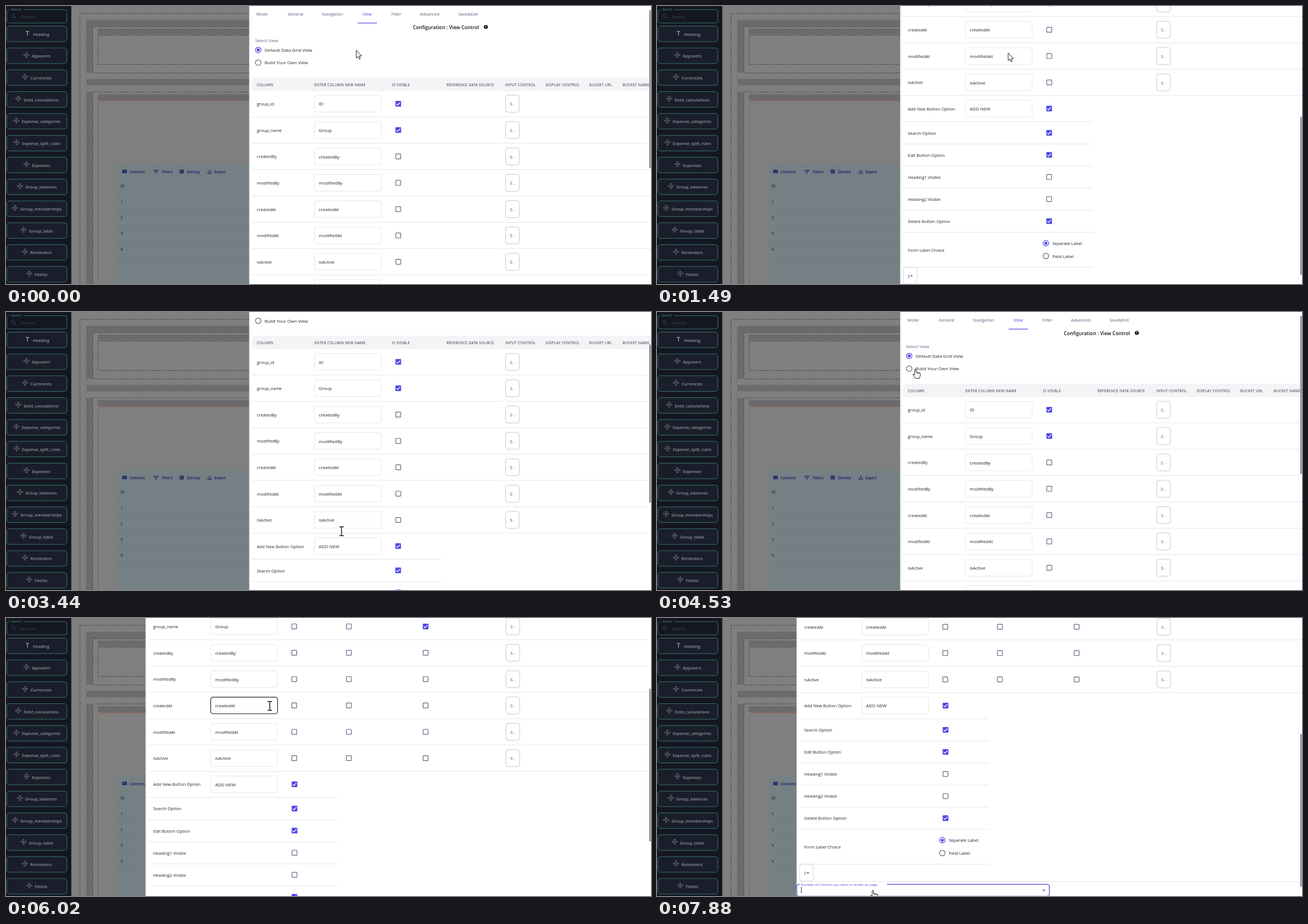
Write an HTML page with a canvas that moves like this. It is 1139 by 492 pixels and loops after 8000 ms.

```html
<!DOCTYPE html>
<html lang="en">
<head>
<meta charset="utf-8">
<title>View configuration</title>
<style>
html, body { margin: 0; width: 100%; height: 100%; overflow: hidden; background: #808080; }
canvas { display: block; width: 1139px; height: 492px; }
</style>
</head>
<body>
<canvas id="stage"></canvas>
<script>
const W = 1139, H = 492, LOOP = 8000, WIDEN = 4670, FOCUS = 7740;
const BLUE = '#4f46e5', INK = '#1f2430', LINE = '#e4e6eb';
const canvas = document.getElementById('stage');
const c = canvas.getContext('2d');
const dpr = window.devicePixelRatio || 1;
canvas.width = W * dpr;
canvas.height = H * dpr;

const ENTITIES = ['Heading', 'Appusers', 'Currencies', 'Debt_calculations', 'Expense_categories',
  'Expense_split_rules', 'Expenses', 'Group_balances', 'Group_memberships', 'Group_table',
  'Reminders', 'Filelist'];
const FIELDS = ['group_id', 'group_name', 'createdBy', 'modifiedBy', 'createdAt', 'modifiedAt', 'isActive'];
const OPTIONS = [['Search Option', 1], ['Edit Button Option', 1], ['Heading1 Visible', 0],
  ['Heading2 Visible', 0], ['Delete Button Option', 1]];
const TABS = [['Mode', 442], ['General', 497.5], ['Navigation', 558], ['View', 629.5],
  ['Filter', 680.5], ['Advanced', 731], ['Save&Exit', 799]];
const SHARED_HEADS = ['REFERENCE DATA SOURCE', 'INPUT CONTROL', 'DISPLAY CONTROL', 'BUCKET URL', 'BUCKET NAME'];
const SHARED_X = [778, 882, 953, 1030, 1089];

// [time, scroll offset]
const SCROLL_NARROW = [[490, 0], [520, 9], [940, 159.3], [1420, 317.5], [2640, 317.5], [2680, 308], [3440, 85], [3720, 0]];
const SCROLL_WIDE = [[5385, 0], [5410, 10], [5480, 39.3], [6300, 290], [6580, 335], [6650, 344]];
// [time, x, y]
const POINTER = [[249, 618, 78], [250, 619, 77], [1430, 619, 77], [2150, 649, 354], [2190, 649, 354],
  [2420, 601, 382], [2640, 601, 382], [2900, 592.5, 388], [3720, 592.5, 388], [4300, 465, 89],
  [4330, 464, 88], [4530, 456, 101], [5040, 456, 101], [5210, 464, 103], [5400, 464, 103],
  [5480, 465, 106], [6250, 466, 169], [6640, 466, 169], [7000, 400, 446], [7340, 374, 463],
  [7570, 374, 463], [7600, 380, 467], [7720, 380, 467], [7880, 381, 482]];

function track(keys, t, k, ease = u => u) {
  if (t <= keys[0][0]) return keys[0][k];
  for (let i = 1; i < keys.length; i++) {
    const a = keys[i - 1], b = keys[i];
    if (t < b[0]) return a[k] + (b[k] - a[k]) * ease((t - a[0]) / (b[0] - a[0]));
  }
  return keys[keys.length - 1][k];
}
const smooth = u => u * u * (3 - 2 * u);

function pointerKind(t) {
  if ((t > 2850 && t < 3760) || (t > 5560 && t < 6720)) return 'text';
  if ((t > 4470 && t < WIDEN) || t > 7040) return 'hand';
  return 'arrow';
}

// y is the middle of the capitals
function text(s, x, y, size = 7.5, color = INK, weight = 400, spacing = 0) {
  c.font = `${weight} ${size}px "Open Sans", "Noto Sans", sans-serif`;
  c.letterSpacing = spacing + 'px';
  c.fillStyle = color;
  c.fillText(s, x, y + size * 0.36);
}
function fill(x, y, w, h, color) {
  c.fillStyle = color;
  c.fillRect(x, y, w, h);
}
function box(x, y, w, h, r, stroke, width = 1, paint) {
  c.beginPath();
  c.roundRect(x, y, w, h, r);
  if (paint) { c.fillStyle = paint; c.fill(); }
  if (stroke) { c.strokeStyle = stroke; c.lineWidth = width; c.stroke(); }
}
function path(points, stroke, width = 1, paint, close) {
  c.beginPath();
  points.forEach(([x, y]) => c.lineTo(x, y));
  if (close) c.closePath();
  if (paint) { c.fillStyle = paint; c.fill(); }
  if (stroke) { c.strokeStyle = stroke; c.lineWidth = width; c.stroke(); }
}
function disc(x, y, r, paint, stroke, width) {
  c.beginPath();
  c.arc(x, y, r, 0, 7);
  if (paint) { c.fillStyle = paint; c.fill(); }
  if (stroke) { c.strokeStyle = stroke; c.lineWidth = width; c.stroke(); }
}
function dashed(points, color) {
  c.setLineDash([2, 2]);
  path(points, color, 1);
  c.setLineDash([]);
}

function checkbox(x, y, on) {
  if (!on) return box(x - 4.4, y - 4.4, 8.8, 8.8, 1, '#5d6880', 1.2);
  box(x - 5, y - 5, 10, 10, 1.2, null, 0, BLUE);
  path([[x - 3.2, y + 0.2], [x - 1.1, y + 2.3], [x + 3.3, y - 2.3]], '#fff', 1.3);
}
function radio(x, y, on, label) {
  disc(x, y, 4.9, null, on ? BLUE : '#5d6880', 1.2);
  if (on) disc(x, y, 2.6, BLUE);
  text(label, x + 11.4, y + 0.4, label.includes('View') ? 7.95 : 7.6);
}
function picker(x, y) {
  box(x, y - 15, 24, 30, 4, '#c5c8cf');
  text('S', x + 7.5, y + 0.5, 7.9, '#4b5563');
  text('...', x + 12.5, y + 0.5, 6, '#7c8494');
}
function dropArrow(x, y, w = 2.8) {
  path([[x - w, y - w / 2], [x + w, y - w / 2], [x, y + w / 2]], null, 0, '#5b6270', true);
}

function moveIcon(x, y) {
  const d = (px, py, r) => path([[px - r, py], [px, py - r], [px + r, py], [px, py + r]], '#8d9096', 0.9, null, true);
  d(x, y, 1);
  for (const [dx, dy] of [[0, -1], [1, 0], [0, 1], [-1, 0]]) d(x + dx * 3.5, y + dy * 3.5, 1.5);
}

function sidebar() {
  fill(0, 0, 115, H, '#141721');
  box(1.5, 6.5, 106, 23.5, 4, '#37706f');
  fill(6, 3, 25, 6, '#141721');
  text('Search', 9, 6.2, 5.6, '#4f9694');
  disc(13, 17.3, 2.8, null, '#3b4252', 1);
  path([[15, 19.5], [18, 22.5]], '#3b4252', 1.1);
  text('Search...', 26, 18.8, 7.8, '#3f4653');
  ENTITIES.forEach((name, i) => {
    const y = 49.3 + i * 38.68;
    box(1.5, y - 13.8, 106, 27.6, 4.5, '#37706f', 1, '#1a1e2a');
    c.font = '600 7.25px "Open Sans", "Noto Sans", sans-serif';
    c.letterSpacing = '0px';
    const x = 54.7 - (14.5 + c.measureText(name).width) / 2;
    if (i) moveIcon(x + 5, y - 1.4);
    else path([[x + 2, y - 4.2], [x + 8, y - 4.2], [x + 5, y - 4.2], [x + 5, y + 3]], '#8d9096', 1.5);
    text(name, x + 14.5, y + 0.6, 7.25, '#90939a', 600);
  });
}

function builder() {
  const gray = '#6b6b6b', dark = '#34363f', rust = '#8d5f4c', navy = '#191b68', R = 431;
  fill(115, 0, 320, H, '#7f7f7f');
  fill(114, 0, 2, H, '#5d5e61');
  fill(142, 25, 290, 11, gray);
  fill(142, 36, 11, 82, gray);
  fill(162, 40, 270, 10.5, gray);
  fill(142, 129, 290, 11, gray);
  fill(142, 152, 11, 340, gray);
  fill(162, 156, 270, 11, gray);
  dashed([[130.5, H], [130.5, 13], [R, 13]], dark);
  dashed([[141.5, 129], [141.5, 24.5], [R, 24.5]], rust);
  dashed([[R, 36.5], [153.5, 36.5], [153.5, 118.5], [R, 118.5]], dark);
  dashed([[R, 51.5], [162.5, 51.5], [162.5, 103.5], [R, 103.5]], dark);
  dashed([[141.5, H], [141.5, 140.5], [R, 140.5]], rust);
  dashed([[153.5, H], [153.5, 152], [R, 152]], dark);
  box(162.5, 167.5, 400, 500, 9, rust);

  fill(197, 280, 240, 212, '#748084');
  for (let i = 0; i < 5; i++) fill(197, 332 + i * 27.8, 240, 1, '#6d787c');
  for (let i = 0; i < 3; i++) {
    fill(205.5 + i * 2.8, 289.7, 2.1, 6.2, navy);
    fill(260 + i * 1.7, 290 + i * 2.5, 9.5 - i * 3.4, 1.1, navy);
    fill(306.5, 289.7 + i * 2.4, 7.5, 1.7, navy);
  }
  path([[356.5, 294], [356.5, 296.3], [363, 296.3], [363, 294]], navy, 1);
  path([[359.8, 289.5], [359.8, 293.8]], navy, 1);
  path([[357.8, 292.2], [359.8, 294.2], [361.8, 292.2]], navy, 1);
  [['Columns', 218], ['Filters', 275], ['Density', 319.5], ['Export', 368]]
    .forEach(([s, x]) => text(s, x, 293.3, 6.4, navy, 600));
  ['ID', '1', '2', '3', '4'].forEach((s, i) => text(s, 202, 318.5 + i * 28, 7.4, '#1c2028'));
}

function panel(t, px, py, kind) {
  const wide = t >= WIDEN;
  const s = track(wide ? SCROLL_WIDE : SCROLL_NARROW, t, 1);
  const dx = wide ? -183 : 0, near = wide ? 1 : 0;
  const left = 429.5 + dx;
  const right = wide ? 586 : 770;
  fill(left, 0, W - left, H, '#fff');
  c.save();
  c.beginPath();
  c.rect(left, 0, W - left, H);
  c.clip();
  c.translate(0, -s);

  const rule = (y, to) => fill(left + 5, y, to - left - 5, 1, LINE);
  const input = (y, value) => {
    const x = 544.5 + dx;
    const hover = kind === 'text' && px > x && px < x + 118 && Math.abs(py + s - y) < 15;
    box(x, y - 14.7, 118, 29.4, 4, hover ? INK : '#e3e6ec', hover ? 1.2 : 1);
    text(value, x + 7.8, y + 0.5, 7.9);
  };

  TABS.forEach(([name, x]) => text(name, x + dx, 14.3, 7.5, name === 'View' ? BLUE : '#52607a'));
  fill(621 + dx, 29.6, 34, 1.2, BLUE);
  const tx = wide ? 627.5 : 718.5;
  text('Configuration : View Control', tx, 38, 8.65, '#15181f', 600);
  disc(tx + 128.8, 37, 3.6, '#15181f');
  text('?', tx + 127.3, 37.1, 5.6, '#fff', 700);

  text('Select View', 440 + dx, 61, 7.9, wide ? BLUE : '#5d6880');
  radio(445.4 + dx, 77.7, !wide, 'Default Data Grid View');
  radio(445.4 + dx, 100.2, wide, 'Build Your Own View');

  c.beginPath();
  c.roundRect(left + 5, 127, W, 23.5, [6, 0, 0, 0]);
  c.fillStyle = '#f3f4f6';
  c.fill();
  const head = (label, x) => text(label, x, 139.2, 6.4, '#2c3340', 500, 0.3);
  head('COLUMN', 443 + dx);
  head('ENTER COLUMN NEW NAME', 544.5 + dx);
  head('IS VISIBLE', wide ? 730 : 681.5);
  if (wide) {
    head('HIDE COLUMN LABEL ?', 498);
    head('SEPERATE OUT DATA AND COLUMN?', 594.5);
  }
  SHARED_HEADS.forEach((h, i) => head(h, SHARED_X[i] + near));

  FIELDS.forEach((name, i) => {
    const y = 173 + i * 46.62;
    text(name, 443 + dx, y + 0.5);
    input(y, ['ID', 'Group'][i] || name);
    if (wide) {
      checkbox(509, y, false);
      checkbox(605.5, y, false);
    }
    checkbox(wide ? 741 : 692.7, y, i < 2);
    picker(882.3 + near * 0.7, y);
    rule(y + 22.8, W);
  });

  const bx = 692.5 + dx;
  text('Add New Button Option', 443 + dx, 499.5);
  input(499, 'ADD NEW');
  checkbox(bx, 499, true);
  rule(521.7, right);
  OPTIONS.forEach(([name, on], i) => {
    const y = 542 + i * 39.05;
    text(name, 443 + dx, y + 0.5);
    checkbox(bx, y, on);
    rule(y + 19.2, right);
  });
  text('Form Label Choice', 443 + dx, 749.3);
  radio(686.8 + dx, 737.3, true, 'Separate Label');
  radio(686.8 + dx, 760, false, 'Field Label');
  rule(779.3, right);

  const sx = left + 5.5;
  box(sx, 779.8, 24, 30, 4, '#d5d8de');
  text('S', sx + 7.5, 795.3, 7.9, '#4b5563');
  dropArrow(sx + 14.5, 795.2, 2.6);
  if (wide) {
    rule(810, W);
    const focus = t >= FOCUS;
    const hover = kind === 'hand' && py + s > 800;
    box(246.8, 815.3, 446, 21, 4, focus ? BLUE : hover ? INK : '#c5c8cf', focus ? 1.3 : 1);
    fill(252, 812, 154, 6, '#fff');
    text('Number of Columns you want to render on page', 254, 815.4, 5.96, focus ? BLUE : '#4b5568');
    dropArrow(683, 826.2);
    if (focus) fill(254.5, 820, 1, 11, INK);
  }
  c.restore();

  const ratio = wide ? 0.576 : 0.595;
  box(1136.3, 7 + s * ratio, 2, wide ? 270.5 : 280, 1, null, 0, '#6a6d78');
}

function pointer(x, y, kind) {
  c.save();
  c.translate(x, y);
  c.lineJoin = 'round';
  if (kind === 'text') {
    for (const [color, w] of [['#fff', 2.6], ['#111', 1.4]]) {
      path([[0, -7.5], [0, 7.5]], color, w);
      path([[-4, -7.8], [4, -7.8]], color, w);
      path([[-4, 7.8], [4, 7.8]], color, w);
    }
  } else if (kind === 'hand') {
    path([[-1, 0.5], [0, -0.3], [1.2, 0.5], [1.4, 5.5], [3.6, 5.3], [4.2, 6.2], [6.2, 6], [6.8, 7],
      [8.5, 7], [9, 8.5], [8.6, 12.5], [7.2, 16.5], [0.6, 16.5], [-3.6, 10.5], [-3.4, 9], [-1, 10.3]],
      '#222', 1, '#fff', true);
    path([[3.6, 6], [3.7, 9]], '#222', 0.8);
    path([[6.2, 6.5], [6.2, 9]], '#222', 0.8);
  } else {
    path([[0.5, 0.5], [0.5, 14.2], [3.6, 11.3], [5.8, 16.2], [7.8, 15.3], [5.7, 10.6], [10, 10.4]],
      '#222', 1, '#fff', true);
  }
  c.restore();
}

function draw(t) {
  c.setTransform(dpr, 0, 0, dpr, 0, 0);
  const x = track(POINTER, t, 1, smooth), y = track(POINTER, t, 2, smooth);
  const kind = pointerKind(t);
  builder();
  sidebar();
  panel(t, x, y, kind);
  pointer(x, y, kind);
}

const start = performance.now();
function tick() {
  draw((performance.now() - start) % LOOP);
  requestAnimationFrame(tick);
}
tick();
</script>
</body>
</html>
```
